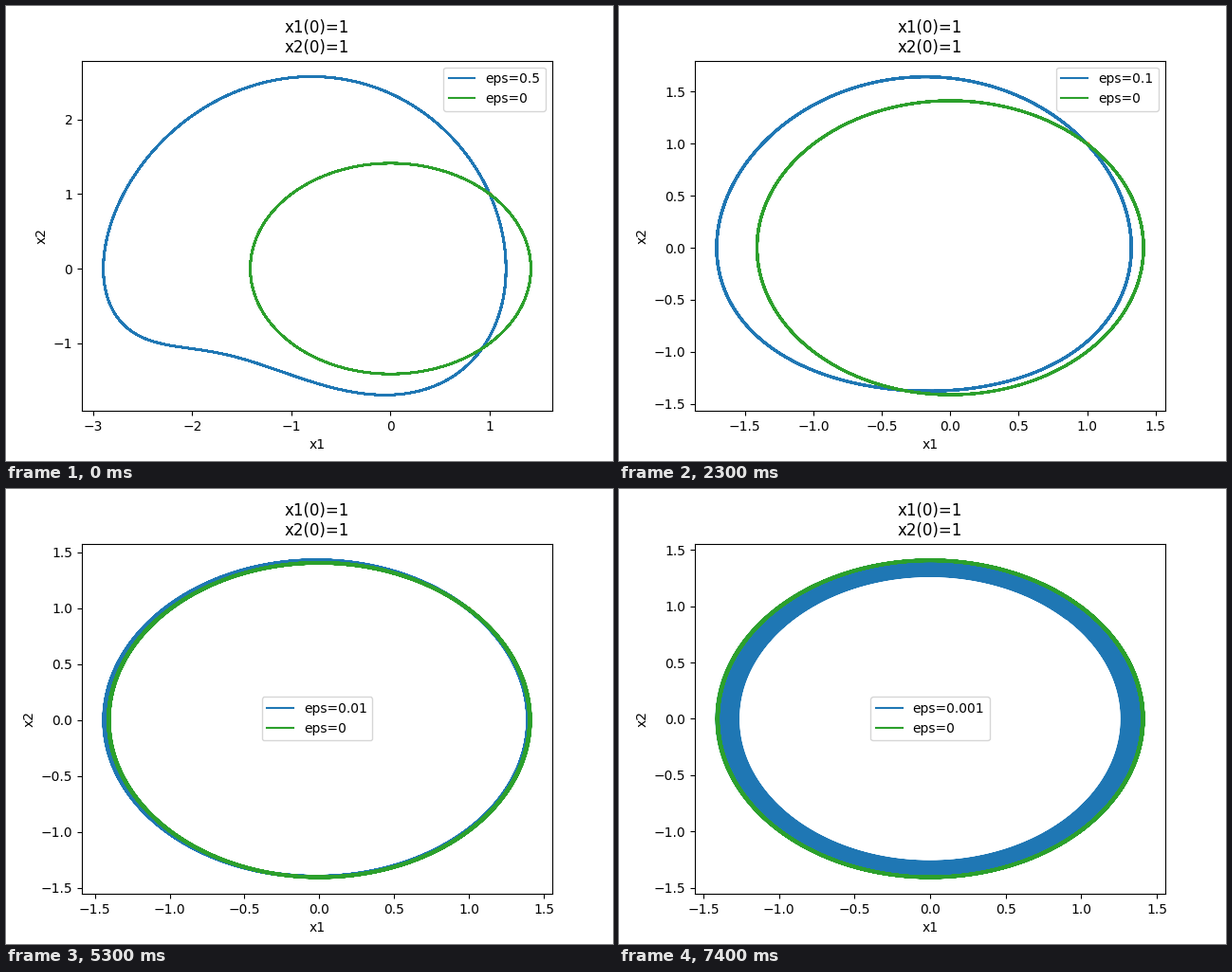
A matplotlib script that plays this animation: 640x480 px, repeating every 8000 ms.

```python
import numpy as np
import matplotlib.pyplot as plt
from matplotlib.animation import FuncAnimation

STEP = 500  # ms per frame
FRAMES = 16
TURNS = 60

# first frame, eps, numerical damping (perturbed, unperturbed), legend place
SCENES = [
    (0, 0.5, 0.001, 0.001, "upper right"),
    (1, 0.1, 0.004, 0.004, "upper right"),
    (7, 0.01, 0.011, 0.010, "center"),
    (13, 0.001, 0.111, 0.010, "center"),
]

fig, ax = plt.subplots(figsize=(6.4, 4.8), dpi=100)


def orbit(eps, damping):
    """Solve x1' = x2, x2' = -x1 - 4 eps cos(t)^2 from (1, 1), slowly damped."""
    t = np.linspace(0, 2 * np.pi * TURNS, 200 * TURNS + 1)
    decay = np.exp(-damping * t / t[-1])
    c = 1 + 4 * eps / 3
    x1 = decay * (c * np.cos(t) + np.sin(t))
    x2 = decay * (np.cos(t) - c * np.sin(t))
    x1 += eps * (2 / 3 * np.cos(2 * t) - 2)
    x2 -= eps * 4 / 3 * np.sin(2 * t)
    return x1, x2


def draw(i):
    _, eps, loss, loss0, place = [s for s in SCENES if s[0] <= i][-1]
    ax.clear()
    ax.plot(*orbit(eps, loss), color="C0", label=f"eps={eps}")
    ax.plot(1, 1, ".", color="C1", markersize=4)
    ax.plot(*orbit(0, loss0), color="C2", label="eps=0")
    ax.set_title("x1(0)=1\nx2(0)=1")
    ax.set_xlabel("x1")
    ax.set_ylabel("x2")
    ax.legend(loc=place)
    return ax.get_children()


anim = FuncAnimation(fig, draw, frames=FRAMES, interval=STEP,
                     init_func=lambda: [], repeat=True, repeat_delay=0)
plt.show()
```
